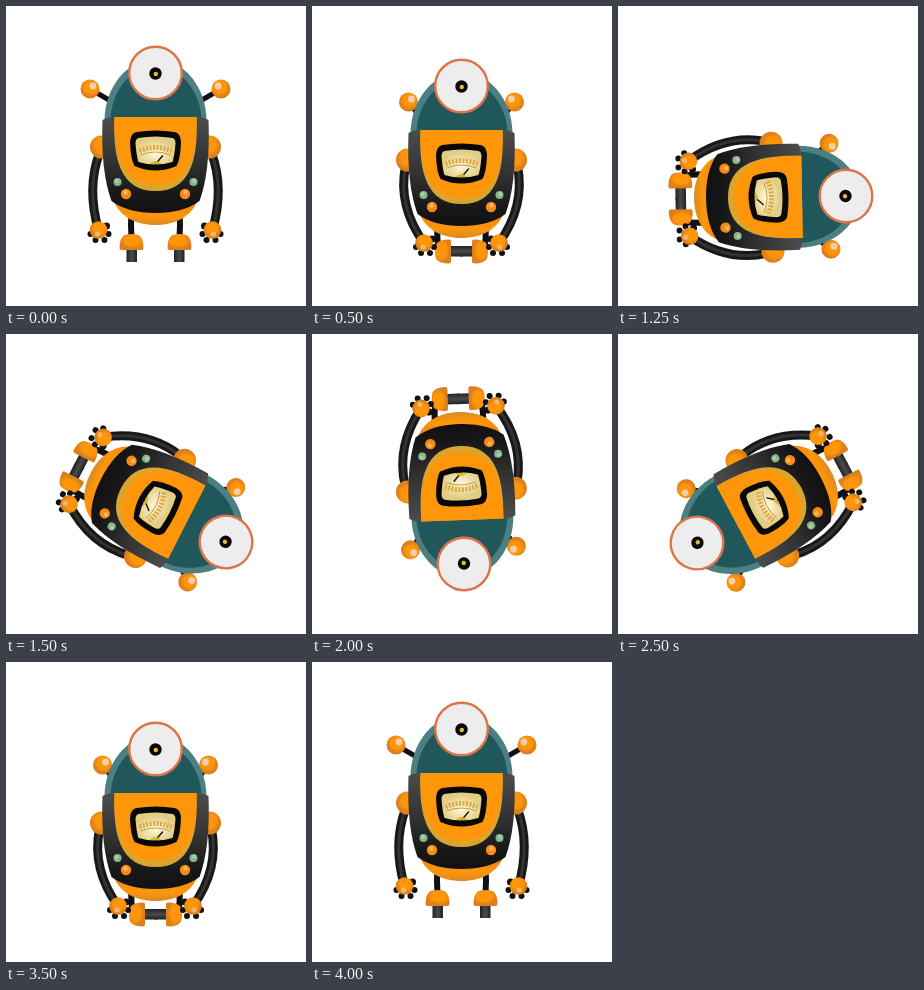
Recreate the animation shown at these times as an HTML page. Size 300 by 300 pixels, loop 4250 ms.

```html
<!DOCTYPE html>
<html>
<head>
<meta charset="utf-8">
<title>Rolling robot</title>
<style>
html, body { margin: 0; width: 100%; height: 100%; overflow: hidden; background: #fff; }
svg { display: block; width: 100vw; height: 100vh; }
</style>
</head>
<body>
<svg viewBox="0 0 300 300">
  <defs>
    <linearGradient id="shell" x2="0" y2="1">
      <stop offset="0" stop-color="#4c4c4c"/><stop offset=".45" stop-color="#333"/>
      <stop offset=".8" stop-color="#181818"/><stop offset="1" stop-color="#111"/>
    </linearGradient>
    <linearGradient id="belly" x2="0" y2="1">
      <stop offset="0" stop-color="#e87a10"/><stop offset=".7" stop-color="#ff960a"/>
      <stop offset="1" stop-color="#d88a24"/>
    </linearGradient>
    <linearGradient id="block" x2="1" y2="0">
      <stop offset="0" stop-color="#222"/><stop offset=".5" stop-color="#4a4a4a"/>
      <stop offset="1" stop-color="#222"/>
    </linearGradient>
    <radialGradient id="dial" cy=".6">
      <stop offset="0" stop-color="#fff9dc"/><stop offset="1" stop-color="#e2cd85"/>
    </radialGradient>
    <radialGradient id="ball" cx=".55" cy=".4">
      <stop offset=".6" stop-color="#ff960a"/><stop offset="1" stop-color="#dc7f1c"/>
    </radialGradient>
  </defs>
  <g id="robot"></g>
</svg>
<script>
const STEP = 250;
// eye x, eye y, angle, tuck (0 standing, 1 rolled up)
const poses = [
  [149.5, 67, 0, 0], [149.5, 72, 0, .5], [149.5, 80, 0, 1],
  [187, 90, 30, 1], [218, 132, 60, 1], [228, 190, 89, 1],
  [220, 208, 117, 1], [190, 229, 148, 1], [152, 230, 178, 1],
  [110.5, 229, 211, 1], [79, 209, 242, 1], [72, 190, 271, 1],
  [83, 131, 301, 1], [111.5, 95, 330, 1], [149.5, 87, 0, 1],
  [149.5, 72, 0, .5], [149.5, 67, 0, 0]
];
const robot = document.getElementById('robot');

const dot = (x, y, r, fill) => `<circle cx="${x}" cy="${y}" r="${r}" fill="${fill}"/>`;
const line = (d, width, color) =>
  `<path d="${d}" fill="none" stroke="${color}" stroke-width="${width}" stroke-linecap="round"/>`;
const shape = (d, fill) => `<path d="${d}" fill="${fill}"/>`;
const both = part => part + `<g transform="scale(-1 1)">${part}</g>`;

// Left-hand limbs, with the origin at the eye
function limbs(tuck) {
  const mix = (a, b) => a + (b - a) * tuck;
  const antenna = mix(-65.5, -53);
  const hand = [mix(-57, -37.5), 157];
  const foot = [mix(-24, -10.5), mix(177, 165.5)];
  const turn = mix(0, -90), rad = turn * Math.PI / 180;
  const ankle = [foot[0] + 12 * Math.sin(rad), foot[1] - 12 * Math.cos(rad)];
  const arm = `M-56 80Q${mix(-69, -64)} ${mix(115, 120)} ${hand}`;

  return line(`M${antenna} 16L-43 29`, 5, '#111')
    + dot(antenna, 16, 9.5, 'url(#ball)')
    + dot(antenna + 3, 13, 3.4, '#f3cfae')
    + line(`M-24 138Q-25 152 ${ankle}`, 6, '#111')
    + `<g transform="translate(${foot}) rotate(${turn})">`
    + '<rect x="-5" y="-1" width="10.5" height="13" fill="url(#block)"/>'
    + shape('M-12 -2Q-12 -12 -7 -15Q0 -17 7 -15Q12 -12 12 -2Q12 0 10 0H-10Q-12 0 -12 -2Z', 'url(#ball)') + '</g>'
    + line(arm, 9, '#181818') + line(arm, 3, '#333')
    + dot(-54, 74, 11.5, 'url(#ball)')
    + `<g transform="translate(${hand})">`
    + dot(-8, 4, 3, '#111') + dot(-3, 10, 3, '#111') + dot(6, 10, 3, '#111')
    + dot(10, 4, 3, '#111') + dot(8, -4, 3.5, '#111')
    + dot(0, 0, 8.8, 'url(#ball)') + dot(-1, 4, 2.6, '#f0b66c') + '</g>';
}

const body =
  shape('M-51 48C-51 14 -28 -14 0 -14S51 14 51 48Z', '#4c7f82')
  + shape('M-45 48C-45 22 -28 -6 0 -6S46 22 46 48Z', '#1f575b')
  + shape('M-44 120C-40 143 -20 152 0 152S40 143 44 120Z', 'url(#belly)')
  + shape('M-53 47Q-48 44 -40 44H40Q48 44 53 47Q55 98 44 128Q28 140 0 140T-44 128Q-55 98 -53 47Z', 'url(#shell)')
  + shape('M-41 44H41C43 88 34 118 0 118S-43 88 -41 44Z', '#d9a52f')
  + shape('M-41 44H41C42 84 32 112 0 112S-42 84 -41 44Z', '#ff960a')
  + shape('M-19 59Q0 56 19 59Q25 60 25.5 69Q25 86 21 93Q0 102 -21 93Q-25 86 -25.5 69Q-25 60 -19 59Z', '#080808')
  + shape('M-17 65Q0 62 17 65Q20 66 20 70Q19 83 17 89Q0 94 -17 89Q-19 83 -20 70Q-20 66 -17 65Z', 'url(#dial)')
  + '<path d="M-16 78Q0 71 16 78" fill="none" stroke="#e0a83c" stroke-width="5" stroke-dasharray="2 1.5"/>'
  + '<path d="M-15 82Q0 76 15 82" fill="none" stroke="#b58a35" stroke-width=".8"/>'
  + line('M0 91L7 83', 1.4, '#111') + shape('M-6 91Q0 85 6 91Z', '#d9b62f')
  + both(dot(-38, 109, 4, '#86b68c') + dot(-38.6, 108, 2, '#a9d0a6')
    + dot(-29.5, 121, 5.2, '#f58a18') + dot(-30, 119.5, 2.2, '#ffb65d'))
  + '<circle r="26.3" fill="#ededed" stroke="#dc7448" stroke-width="2.4"/>'
  + dot(0, .5, 6.2, '#080808') + dot(.3, 1, 2.2, '#e5bd32');

let shown = -1;
function draw(now) {
  const i = Math.floor(now / STEP) % poses.length;
  if (i !== shown) {
    const [x, y, angle, tuck] = poses[i];
    robot.setAttribute('transform', `translate(${x} ${y}) rotate(${angle})`);
    robot.innerHTML = both(limbs(tuck)) + body;
    shown = i;
  }
  requestAnimationFrame(draw);
}
draw(performance.now());
</script>
</body>
</html>
```
